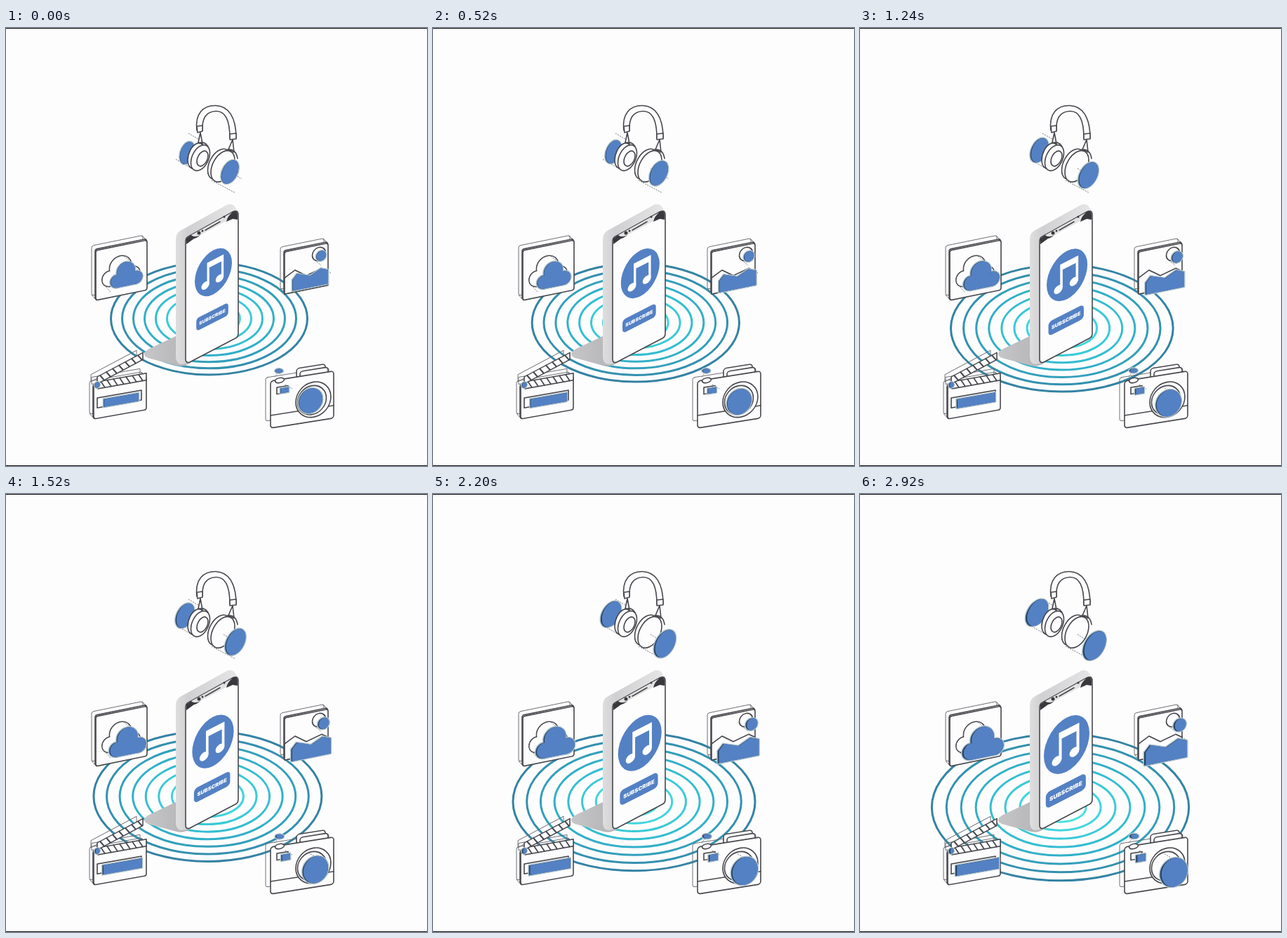
These frames come from a looping animation (600 by 624 pixels, 2.96 s). An HTML page:

```html
<!DOCTYPE html>
<html lang="en">
<head>
<meta charset="utf-8">
<title>Media rings</title>
<style>
  html, body { margin: 0; width: 100%; height: 100%; overflow: hidden; background: #fefdfe; }
  svg { display: block; width: 600px; height: 624px; }
  defs * { vector-effect: non-scaling-stroke; }
  .ink { fill: #fefdfe; stroke: #46474c; stroke-width: 1.6; stroke-linejoin: round; stroke-linecap: round; }
  .edge { fill: none; stroke: #46474c; stroke-width: 3; }
  .thin { fill: none; stroke: #66676c; stroke-width: .9; stroke-linejoin: round; }
  .line { fill: none; }
  .dash { fill: none; stroke: #66676c; stroke-width: .9; stroke-dasharray: 2 1.5; }
  .rim { fill: none; stroke: #b3c5cd; stroke-width: 3; stroke-linejoin: round; }
  .white { fill: #fefdfe; }
  .deep { fill: #24425f; }
  .blue { fill: #5481c4; }
  .dark { fill: #39393d; }
  .ring { fill: none; stroke-width: 3; }
  .label { font: 900 8.2px Inter, "Open Sans", sans-serif; fill: #fff; text-anchor: middle; }
</style>
</head>
<body>
<svg viewBox="0 0 600 624">
  <defs>
    <linearGradient id="side"><stop stop-color="#dededf"/><stop offset=".2" stop-color="#d0d0d2"/><stop offset="1" stop-color="#e6e6e7"/></linearGradient>
    <linearGradient id="shade"><stop stop-color="#c6c6c8"/><stop offset="1" stop-color="#b2b2b5"/></linearGradient>
    <!-- Flat shapes, one unit from centre to edge -->
    <circle id="disc" r="1"/>
    <rect id="bar" x="-1" y="-1" width="2" height="2"/>
    <g id="cloud"><g transform="scale(.0333)">
      <circle cx="-18" cy="6.500" r="12"/><circle cx="18" cy="6.500" r="12"/>
      <circle cx="-1" cy="-9" r="17"/><rect x="-18" y="0" width="36" height="18.500"/>
    </g></g>
    <path id="hills" transform="scale(.0323)" d="M-31-4L-23-13 0-5 18-14 31-9V15H-31Z"/>
  </defs>
  <g id="rings"></g>

  <path fill="url(#shade)" d="M244 438L204 457Q191 464 202 470L243 481Q256 484 266 474L256 440Z"/>
  <path fill="url(#side)" d="M242 301Q242 293 248 289L313 253Q319 249 325 253L331 262V437L259 477Q242 484 242 467Z"/>
  <path class="ink" d="M256 304Q256 299 260 297L323 262Q331 258 331 267V435Q331 440 327 442L262 476Q256 478 256 472Z"/>
  <path class="dark" d="M257 308V300L264 295Q267 299 278 294 273 299 268 300ZM314 276Q315 268 323 262 330 259 330 266V273L323 272Z"/>
  <path fill="#e2e2e3" d="M264 295L322 263Q316 268 314 275L277 295Q270 299 264 295Z"/>
  <path class="ink line" d="M284 288L305 276"/>
  <g class="dark"><circle cx="275" cy="292" r="2.500"/><circle cx="280" cy="289" r="1.500"/><circle cx="311" cy="269" r="1.500"/></g>
  <g id="music">
    <ellipse class="blue" rx="32.500" ry="38.500"/>
    <g fill="#fff">
      <path d="M-11-22H18V16H14V-12H-7V16H-11Z"/>
      <ellipse cx="-14" cy="16" rx="7" ry="6.500"/><ellipse cx="11" cy="16" rx="7" ry="6.500"/>
    </g>
  </g>
  <g id="button">
    <rect class="blue" x="-28.500" y="-11.500" width="57" height="23" rx="6"/>
    <text class="label" y="3">SUBSCRIBE</text>
  </g>

  <g id="headphones">
    <path class="dash" d="M260 150L287 166M242 187L268 202M293 217L327 235M318 203L336 215"/>
    <g id="leftCup"></g>
    <path class="ink" d="M272 146C269 122 281 110 299 110.500S328 127 328 157H319C319 132 313 118 299 118.500S279 129 280 146Z"/>
    <path class="ink" d="M272 140L280 139V147L273 149ZM319 151L328 150V158L319 159ZM277 149L274 163 280 165ZM323 159L317 173 325 177Z"/>
    <path class="ink line" d="M274 164Q283 161 288 169M316 173Q328 172 330 186"/>
    <g id="pads"></g>
    <path class="dash" d="M310 200L321 207"/>
    <g id="rightCup"></g>
  </g>

  <g id="cloudCard" transform="translate(128 317) skewY(-11.500)"></g>
  <g id="whiteCloud"></g>
  <path class="dash" d="M138 364L150 377M168 325L178 333"/>
  <g id="blueCloud"></g>

  <g id="photoCard" transform="translate(397 319) skewY(-11.500)"></g>
  <g class="ink" transform="translate(397 319) skewY(-11.500)">
    <circle cx="49" cy="13" r="9.500"/>
    <path d="M0 37L15 29 31 40 53 34 62 40V60H0Z"/>
  </g>
  <path class="dash" d="M449 342L463 349M440 331L449 338"/>
  <g id="sun"></g>
  <g id="range"></g>

  <g id="board" transform="translate(125 510) skewY(-10)"></g>
  <g transform="translate(125 510) skewY(-10)">
    <rect class="ink" x="5" y="18" width="63" height="14"/>
    <g id="lowArm" transform="translate(6 -5)"></g>
  </g>
  <g id="highArm" transform="translate(130 497) skewY(-28)"></g>
  <g id="hinge"></g>
  <g id="slate"></g>

  <g class="ink" transform="translate(377 503) skewY(-9)">
    <rect class="thin" x="-7" y="-6" width="90" height="62" rx="3"/>
    <rect x="37" y="-12" width="41" height="20" rx="4"/>
    <rect x="42" y="-7" width="40" height="20" rx="4"/>
    <rect width="90" height="67" rx="4"/>
    <path d="M0 49H90"/>
    <ellipse cx="13" cy="1" rx="6.500" ry="3.500"/>
    <rect x="9" y="10.500" width="16" height="9.500"/>
    <circle cx="61" cy="36" r="25"/><circle cx="59" cy="36.500" r="20.500"/>
  </g>
  <path class="dash" d="M383 497L390 488M398 508L408 514M431 511L445 519"/>
  <g id="shutter"></g>
  <g id="flash"></g>
  <g id="lens"></g>
  <path d="M0 .5H600M0 623.500H600" stroke="#111"/>
</svg>
<script>
const PHONE = -27, CARD = -11.5, BOARD = -10;
const updates = [];
const $ = id => document.getElementById(id);
const mix = (a, b, p) => a + (b - a) * p;
const mixAll = (a, b, p) => a.map((v, i) => mix(v, b[i], p));

function add(parent, tag, attrs) {
  const el = document.createElementNS("http://www.w3.org/2000/svg", tag);
  for (const key in attrs) el.setAttribute(key, attrs[key]);
  return parent.appendChild(el);
}

// Puts a flat shape on a slanted plane; w and h are its half sizes.
function place(el, x, y, w, h, slant) {
  el.setAttribute("transform", `translate(${x} ${y}) skewY(${slant}) scale(${w} ${h})`);
}
const layer = (id, shape, name) => add($(id), "use", { href: "#" + shape, class: name });

function glide(id, from, to) {
  updates.push(p => {
    const [x, y, size] = mixAll(from, to, p);
    place($(id), x, y, size, size, PHONE);
  });
}

// A blue face with a dark side that grows as it lifts off
function lift(id, shape, slant, from, to) {
  const [rim, deep, face] = ["rim", "deep", "blue"].map(name => layer(id, shape, name));
  updates.push(p => {
    const [x, y, w, h] = mixAll(from, to, p), depth = mix(.3, 1.1, p);
    place(rim, x, y, w, h, slant);
    place(deep, x, y, w, h, slant);
    place(face, x + depth, y, w - depth, h, slant);
  });
}

function plate(id, w, h) {
  const group = $(id), rect = (name, x, y) => add(group, "rect", { class: name, x, y, width: w, height: h, rx: 3 });
  rect("thin", -6, -8);
  add(group, "path", { class: "thin", d: `M${w - 7}-8l6 8M-6 ${h - 9}l6 8` });
  rect("ink", -1, -2);
  rect("ink", 0, 0);
}

function arm(id, w, h) {
  add($(id), "rect", { class: "thin", x: -9, y: -8, width: w, height: h });
  add($(id), "rect", { class: "ink", width: w, height: h });
  for (let x = 4; x < w - 6; x += 9) add($(id), "path", { class: "ink line", d: `M${x} 0l6 ${h}` });
}

const RINGS = 8;
for (let i = 0; i < RINGS; i++) {
  const size = 1 - .1143 * i, k = i / (RINGS - 1);
  const ring = add($("rings"), "ellipse", {
    class: "ring", stroke: `hsl(${mix(197, 180, k)} ${mix(52, 72, k)}% ${mix(42, 58, k)}%)`
  });
  updates.push(p => {
    ring.setAttribute("cx", mix(289.5, 285.5, p));
    ring.setAttribute("cy", mix(414, 446.3, p));
    ring.setAttribute("rx", mix(140, 183.2, p) * size);
    ring.setAttribute("ry", mix(80, 104.5, p) * size);
  });
}

const pad = (x, y, w, h) => place(layer("pads", "disc", "ink"), x, y, w, h, PHONE);
pad(271, 182, 12, 17);
pad(277, 185, 13.5, 17);
pad(280, 186, 8, 10);
pad(304, 194, 16.5, 20);
pad(309, 197, 17, 20.5);

plate("cloudCard", 73, 71);
plate("photoCard", 62, 60);
plate("board", 75, 47);
arm("lowArm", 69, 10);
arm("highArm", 65, 10);
for (const name of ["edge", "white"]) place(layer("whiteCloud", "cloud", name), 164, 348, 26.5, 26.5, CARD);

glide("music", [295.5, 348, .815], [294.5, 357, 1]);
glide("button", [294, 411.5, .8], [293.3, 423, 1]);
lift("leftCup", "disc", PHONE, [258, 178, 10.5, 15], [252, 169, 16, 17.5]);
lift("rightCup", "disc", PHONE, [319, 205, 12.5, 15.5], [334, 216, 16.5, 19]);
lift("blueCloud", "cloud", CARD, [171.5, 353, 23, 23], [175, 357, 29.5, 29.5]);
lift("sun", "disc", CARD, [449, 324.5, 7, 7], [455.5, 329, 9, 9]);
lift("range", "hills", CARD, [433.5, 357, 25.5, 25.5], [435.5, 366, 30.5, 30.5]);
lift("hinge", "disc", BOARD, [130, 508.5, 3.5, 4], [130, 508.5, 3.5, 4]);
lift("slate", "bar", BOARD, [164, 530, 25, 5.7], [167, 531.3, 31, 7.5]);
lift("shutter", "disc", 0, [389, 488.5, 5.5, 3], [390.5, 487.5, 6.5, 3.5]);
lift("flash", "bar", BOARD, [397, 516, 6, 3.5], [400, 518.5, 6.8, 5]);
lift("lens", "disc", BOARD, [434, 531, 17, 17.5], [447, 539, 19.5, 20.5]);

const LOOP = 2960, STEP = 40;
const start = performance.now();
function frame() {
  const t = Math.max(0, performance.now() - start) % LOOP;
  const p = Math.floor(t / STEP) / (LOOP / STEP - 1);
  updates.forEach(update => update(p));
  requestAnimationFrame(frame);
}
frame();
</script>
</body>
</html>
```
